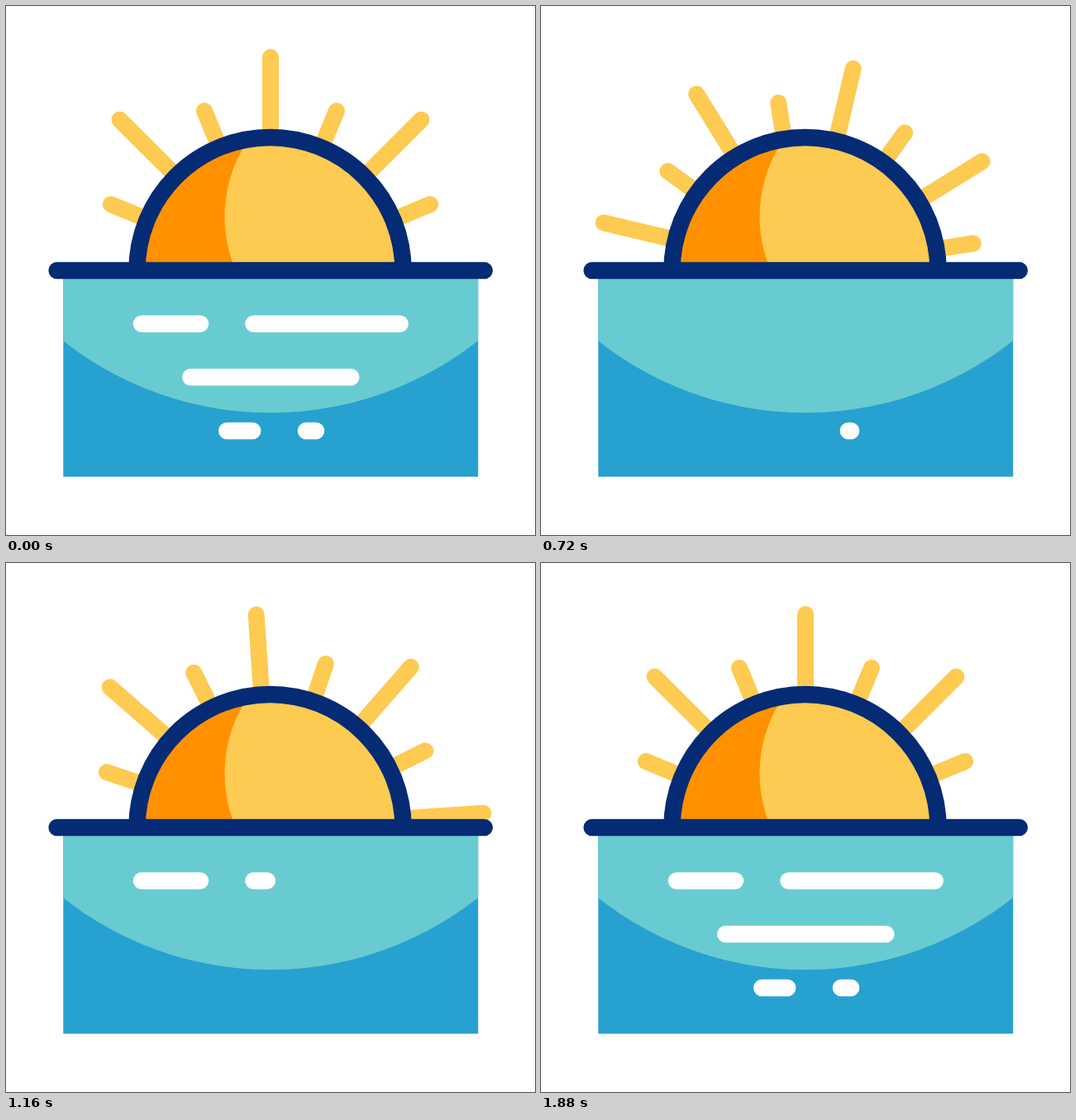
An HTML page for the animation above (1960 ms loop, 640 by 640 pixels).

```html
<!DOCTYPE html>
<html lang="en">
<head>
<meta charset="utf-8">
<title>Sunset over water</title>
<style>
  html, body { margin: 0; width: 100%; height: 100%; overflow: hidden; background: #fff; }
  svg { display: block; width: 100vw; height: 100vh; }
</style>
</head>
<body>
<svg viewBox="0 0 640 640" fill="none" stroke-linecap="round">
  <defs>
    <clipPath id="sky"><rect width="640" height="320"/></clipPath>
    <clipPath id="disc"><path d="M158.5 320a161 161 0 0 1 322 0z"/></clipPath>
    <clipPath id="sea"><rect x="69.3" y="322" width="501.9" height="247.6"/></clipPath>
  </defs>
  <g clip-path="url(#sky)"><g id="rays" stroke="#fdca52" stroke-width="20"></g></g>
  <g clip-path="url(#disc)">
    <rect x="150" y="150" width="340" height="170" fill="#ff9100"/>
    <path d="M490 150H302A165 165 0 0 0 278 320H490z" fill="#fdca52"/>
  </g>
  <path d="M158.5 320a161 161 0 0 1 322 0" stroke="#042b74" stroke-width="20.5" stroke-linecap="butt"/>
  <g clip-path="url(#sea)">
    <rect width="640" height="640" fill="#27a1cf"/>
    <circle cx="320" cy="86.5" r="405.6" fill="#68cbd1"/>
  </g>
  <path d="M61.6 320H578.7" stroke="#042b74" stroke-width="20.5"/>
  <g id="bars" stroke="#fff" stroke-width="20.5"></g>
</svg>
<script>
const STEP = 40, LOOP = 1960, LAST = 47;
const RAY_BASE = 158, RAY_COUNT = 16;

const clamp = v => Math.min(1, Math.max(0, v));
const mix = (a, b, t) => a + (b - a) * t;

// Ease-in-out curve with handles at 0.42 and 0.58, solved by bisection.
function ease(x) {
  if (x <= 0 || x >= 1) return clamp(x);
  let lo = 0, hi = 1, s;
  for (let i = 0; i < 24; i++) {
    s = (lo + hi) / 2;
    const at = 1.26 * s * (1 - s) ** 2 + 1.74 * s * s * (1 - s) + s ** 3;
    if (at < x) lo = s; else hi = s;
  }
  return s * s * (3 - 2 * s);
}
const span = (k, from, to) => ease((k - from) / (to - from));

// Swing back, turn by one ray pair, overshoot and settle: [step, degrees, slope].
const turn = [[0, 0, 0], [7, -6, 0], [18, 13.3, 2.4], [26, 33.4, 2.4], [34.5, 50, 0], [LAST, 45, 0]];
function angleAt(k) {
  const i = Math.max(1, turn.findIndex(p => p[0] >= k));
  const [k0, a0, m0] = turn[i - 1], [k1, a1, m1] = turn[i];
  const d = k1 - k0, t = (k - k0) / d;
  return mix(a0, a1, t * t * (3 - 2 * t))
    + d * (m0 * t * (1 - t) ** 2 - m1 * t * t * (1 - t));
}

function addLine(parent) {
  const line = document.createElementNS("http://www.w3.org/2000/svg", "path");
  return parent.appendChild(line);
}
function draw(line, visible, d) {
  line.setAttribute("d", visible ? d : "");
}

const rayGroup = document.getElementById("rays");
const rays = Array.from({ length: RAY_COUNT }, (_, i) => {
  const line = addLine(rayGroup);
  line.setAttribute("transform", `rotate(${i * 360 / RAY_COUNT})`);
  return { line, tip: i % 2 ? 209 : 258 };
});

// Bars share one trim that runs through them in order.
let total = 0;
const barGroup = document.getElementById("bars");
const bars = [
  [164, 235, 384.5], [299.5, 476.7, 384.5], [223.3, 417.3, 449],
  [267.3, 298.2, 514], [363, 375, 514]
].map(([x0, x1, y]) => {
  const bar = { line: addLine(barGroup), x0, x1, y, offset: total };
  total += x1 - x0;
  return bar;
});

function render(time) {
  const k = Math.min(LAST, Math.floor((time % LOOP) / STEP));

  const leaving = k < 11;
  const rayStart = leaving ? span(k, 0, 11) : 0;
  const rayEnd = leaving ? 1 : span(k, 11, 19.6);
  rayGroup.setAttribute("transform", `translate(320 320) rotate(${angleAt(k)})`);
  for (const { line, tip } of rays) {
    const from = mix(RAY_BASE, tip, rayStart), to = mix(RAY_BASE, tip, rayEnd);
    draw(line, to > from, `M0 ${-from}V${-to}`);
  }

  const emptying = k < 20;
  const barStart = emptying ? total * span(k, 0, 19.1) : 0;
  const barEnd = emptying ? total : total * span(k, 21.5, LAST);
  for (const { line, x0, x1, y, offset } of bars) {
    const from = Math.max(x0, x0 + barStart - offset);
    const to = Math.min(x1, x0 + barEnd - offset);
    draw(line, to > from, `M${from} ${y}H${to}`);
  }
}

const begin = performance.now();
function tick() {
  render(performance.now() - begin);
  requestAnimationFrame(tick);
}
tick();
</script>
</body>
</html>
```
